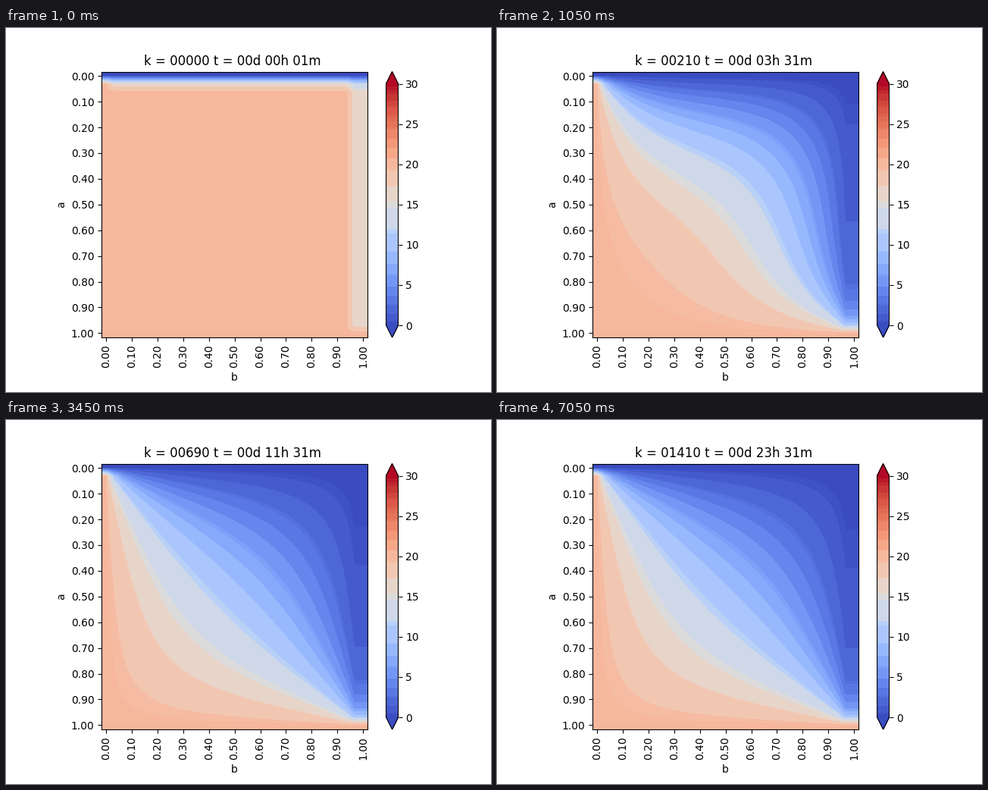
A matplotlib script for the animation above (7200 ms loop, 640 px wide and 480 px high).

```python
import numpy as np
import matplotlib.pyplot as plt
from matplotlib.animation import FuncAnimation
from matplotlib.colors import ListedColormap

N = 31                                 # grid nodes per side
ALPHA = 3.352e-6                       # diffusivity in m^2/s
R = ALPHA * 60 * (N - 1) ** 2          # one step per minute, unit square
FRAMES = 48
STRIDE = 30                            # steps between pictures
T_MAX = 30.0


def start_field():
    t = np.full((N, N), 20.0)
    t[0, :] = 0.0
    t[:-1, -1] = 0.0
    return t.tolist()


def step(old, new):
    """Diffuse old into new; passing one grid twice updates it in place."""
    for i in range(1, N - 1):
        up, row, down, out = old[i - 1], old[i], old[i + 1], new[i]
        for j in range(1, N - 1):
            out[j] = row[j] + R * (up[j] + down[j] + row[j - 1] + row[j + 1]
                                   - 4 * row[j])


def snapshot(t):
    a = np.array(t)
    a[:, -1] = a[:, -2]
    return a


def simulate():
    t = start_field()
    step(start_field(), t)
    shots = [snapshot(t)]
    for _ in range(FRAMES - 1):
        for _ in range(STRIDE):
            step(t, t)
        shots.append(snapshot(t))
    return shots


def upsample(a, size=350):
    """Bilinear enlargement with flat outer half cells."""
    nodes = np.arange(N)
    fine = (np.arange(size) + 0.5) * N / size - 0.5
    wide = np.array([np.interp(fine, nodes, row) for row in a])
    return np.array([np.interp(fine, nodes, col) for col in wide.T]).T


def banded_cmap(field):
    """Coolwarm merged into coarse RGB cells, each shown as its mean colour."""
    rgb = plt.get_cmap("coolwarm")(np.arange(256), bytes=True)[:, :3].astype(int)
    cell = (rgb[:, 0] >> 5) * 256 + (rgb[:, 1] >> 4) * 8 + (rgb[:, 2] >> 5)
    index = np.clip(upsample(field) / T_MAX * 256, 0, 255).astype(int)
    weight = np.bincount(index.ravel(), minlength=256) + 20.0
    bands = np.empty((256, 3))
    for c in np.unique(cell):
        same = cell == c
        bands[same] = np.floor(np.average(rgb[same], axis=0, weights=weight[same]))
    return ListedColormap(bands / 255)


shots = simulate()

fig, ax = plt.subplots(figsize=(6.4, 4.8), dpi=100)
fig.subplots_adjust(bottom=0.15)
im = ax.imshow(shots[0], cmap=banded_cmap(shots[0]), vmin=0, vmax=T_MAX,
               interpolation="bilinear")
fig.colorbar(im, ax=ax, extend="both", aspect=22, ticks=np.arange(0, 31, 5))

ticks = np.arange(0, N, 3)
labels = [f"{k / (N - 1):.2f}" for k in ticks]
ax.set_xticks(ticks, labels, rotation=90)
ax.set_yticks(ticks, labels)
ax.set_xlabel("b")
ax.set_ylabel("a")
title = ax.set_title("", x=0.4925)


def update(n):
    k = n * STRIDE
    hours, minutes = divmod(k + 1, 60)
    days, hours = divmod(hours, 24)
    im.set_data(shots[n])
    title.set_text(f"k = {k:05d} t = {days:02d}d {hours:02d}h {minutes:02d}m")
    return im, title


anim = FuncAnimation(fig, update, frames=FRAMES, interval=150, repeat=True,
                     repeat_delay=0, blit=False)
plt.show()
```
